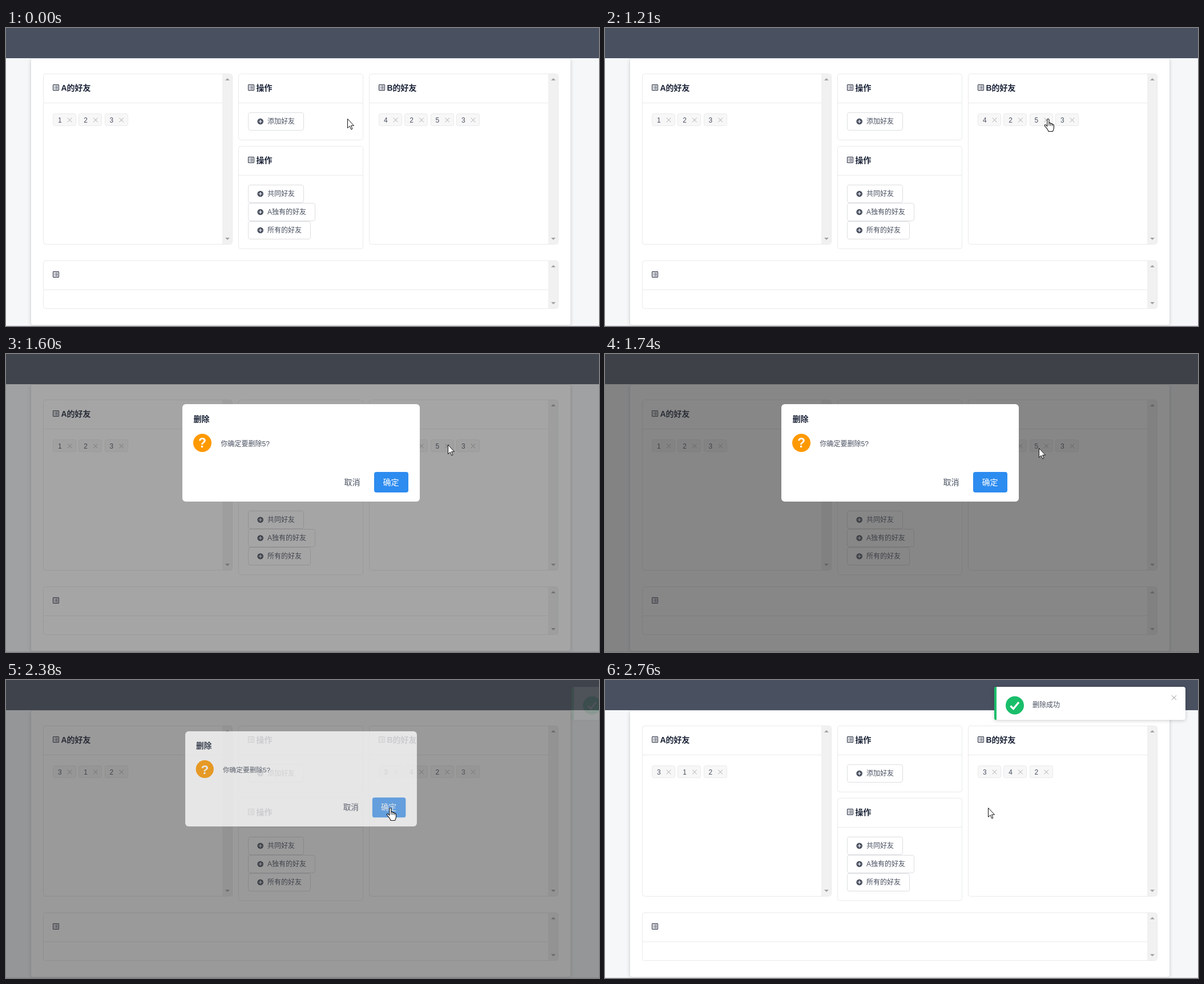
An HTML page for the animation above (3.71 s loop, 1039 by 523 pixels).

```html
<!DOCTYPE html>
<html lang="zh">
<head>
<meta charset="utf-8">
<title>好友</title>
<style>
  html, body { margin: 0; width: 100%; height: 100%; overflow: hidden; background: #f5f7f9; }
  svg { display: block; font-family: "Liberation Sans", "Noto Sans CJK SC", "Noto Sans CJK", sans-serif; }
  .shadow { filter: drop-shadow(0 1px 3px rgba(0, 0, 0, .2)); }
  #dialog { transform-origin: 517px 173.5px; }
</style>
</head>
<body>
<svg id="stage" width="1039" height="523" viewBox="0 0 1039 523"></svg>
<script>
const LOOP = 3710;
const INK = '#495060', TITLE = '#1c2438', LINE = '#e9eaec';

// Static drawing helpers, each returning SVG markup
const rect = (x, y, w, h, fill, extra = '') =>
  `<rect x="${x}" y="${y}" width="${w}" height="${h}" fill="${fill}" ${extra}/>`;
const outline = (x, y, w, h, fill, stroke, r) =>
  rect(x + .5, y + .5, w - 1, h - 1, fill, `stroke="${stroke}" rx="${r}"`);
const path = (d, stroke, width = 1, fill = 'none') =>
  `<path d="${d}" stroke="${stroke}" stroke-width="${width}" fill="${fill}"/>`;
const circle = (x, y, r, fill) => `<circle cx="${x}" cy="${y}" r="${r}" fill="${fill}"/>`;
const text = (x, middle, string, size = 12, fill = INK, extra = '') =>
  `<text x="${x}" y="${middle + size * .365}" font-size="${size}" fill="${fill}" ${extra}>${string}</text>`;
const cross = (x, y, r, stroke) =>
  path(`M${x - r} ${y - r}l${2 * r} ${2 * r}m0 ${-2 * r}l${-2 * r} ${2 * r}`, stroke);

function heading(x, y, string) {
  const icon = outline(x, y - 6, 11, 11, 'none', TITLE, .5) +
    [-3, -.5, 2].map(dy => path(`M${x + 2} ${y + dy}h1.2m1 0h4.8`, TITLE)).join('');
  return icon + text(x + 14.5, y, string, 14, TITLE, 'font-weight="bold"');
}

function scrollbar(right, top, bottom) {
  const x = right - 9;
  return path(`M${right - 18} ${top + 1}h14q3 0 3 3V${bottom - 4}q0 3-3 3h-14z`, 'none', 0, '#f1f1f1') +
    path(`M${x - 4} ${top + 12}l4-4 4 4z`, 'none', 0, '#a3a3a3') +
    path(`M${x - 4} ${bottom - 12}l4 4 4-4z`, 'none', 0, '#a3a3a3');
}

function panel(x, y, w, h, title, scrolls) {
  return outline(x, y, w, h, '#fff', LINE, 4) +
    rect(x + 1, y + 51, w - (scrolls ? 19 : 2), 1, LINE) +
    (scrolls ? scrollbar(x + w, y, y + h) : '') +
    heading(x + 17, y + 25, title);
}

function button(y, w, label) {
  return outline(424, y, w, 32, '#fff', '#dddee1', 3.5) +
    circle(445.7, y + 16, 5.3, INK) +
    path(`M442.7 ${y + 16}h6m-3-3v6`, '#fff', 1.2) +
    text(458, y + 15.5, label);
}

function tag(x, digit) {
  return outline(Math.round(x), 150, 41, 22, '#f7f7f7', LINE, 3) +
    text(x + 9, 161.5, digit) + cross(x + 29.6, 161.5, 3.8, '#aaa');
}
const tags = (x, digits) => [...digits].map((d, i) => tag(x + i * 45.3, d)).join('');

stage.innerHTML = `
  <g class="shadow">${rect(44, 54, 945, 467, '#fff', 'rx="4"')}</g>
  ${rect(0, 0, 1039, 53, INK)}
  ${rect(0, 522, 1039, 1, '#dadcdf')}
  ${panel(65, 80, 332, 300, 'A的好友', true)}
  ${panel(407, 80, 219, 117, '操作')}
  ${panel(407, 207, 219, 181, '操作')}
  ${panel(636, 80, 332, 300, 'B的好友', true)}
  ${panel(65, 408, 903, 85, '', true)}
  ${button(148, 98, '添加好友')}
  ${button(275, 98, '共同好友')}
  ${button(307, 118, 'A独有的好友')}
  ${button(339, 110, '所有的好友')}
  <g id="before">${tags(82, '123')}${tags(653, '4253')}</g>
  <g id="after">${tags(82, '312')}${tags(653, '342')}</g>
  <g id="leaving">${tag(653 + 3 * 45.3, '3')}</g>
  ${rect(0, 0, 1039, 523, 'rgb(55,55,55)', 'id="mask"')}
  <g id="dialog">
    ${rect(309, 88, 416, 171, '#fff', 'rx="6"')}
    ${text(328.5, 114, '删除', 14, TITLE, 'font-weight="bold"')}
    ${circle(344, 156, 16, '#f90')}
    ${text(344, 156, '?', 23, '#fff', 'font-weight="bold" text-anchor="middle"')}
    ${text(376.5, 157.5, '你确定要删除5?')}
    ${text(592.5, 224.5, '取消', 14)}
    ${rect(645, 207, 60, 36, '#2d8cf0', 'rx="4" id="confirm"')}
    ${text(660.5, 224.5, '确定', 14, '#fff')}
  </g>
  <g id="notice" class="shadow">
    ${rect(682, 12, 335, 58, '#fff', 'rx="4"')}
    ${path('M686 12h-1q-3 0-3 3v52q0 3 3 3h1z', 'none', 0, '#19be6b')}
    ${circle(718, 44.5, 16, '#19be6b')}
    ${path('M710.5 45.5l5 5 9.5-11.5', '#fff', 3.4)}
    ${text(749, 44, '删除成功')}
    ${cross(997, 31, 4, '#999')}
  </g>
  <g id="cursor">
    <g id="arrow">${path('M.5.5V16.5L4.2 13.2 6.8 19 9 18 6.5 12.3H11.5Z', '#111', 1, '#fff')}</g>
    <g id="hand">
      ${path('M.8 1.8Q2.4-.8 4 1.8V7.5Q6.4 6.8 7 8.8 9.4 8 10 10.2 12.5 9.6 12.5 12V16Q12.4 19 10.5 22.5H3Q2 19-3.4 13.2-4.4 11-2.5 10.8-.6 11.2.8 13.8Z', '#111', 1.1, '#fff')}
      ${path('M4 7.5v5m3-3.7v4m3-2.6v3', '#111')}
    </g>
  </g>`;

const part = Object.fromEntries([...stage.querySelectorAll('[id]')].map(node => [node.id, node]));

// Pointer positions: [time, x, y]
const pointer = [
  [0, 598, 159], [430, 606, 164], [510, 640, 176], [580, 690, 182], [660, 735, 180],
  [740, 762, 173], [810, 773, 167], [890, 775, 167], [980, 777, 165], [1060, 775, 162],
  [1130, 773, 160], [1210, 774, 159], [1680, 760, 165], [1750, 735, 178], [1830, 700, 190],
  [1910, 680, 198], [2000, 673, 212], [2070, 671, 220], [2150, 671, 224]
];
// The screen refreshes only at these moments
const refreshes = [...pointer.map(p => p[0]), 1440, 1510, 1600, 2380, 2460, 2530, 2620, 2690, 2760];

const OPEN = 1376, CLOSE = 2331;
const ramp = (t, start, duration) => Math.min(1, Math.max(0, (t - start) / duration));
const easeInOut = p => .5 - .5 * Math.cos(Math.PI * p);
const mix = (a, b, p) => a + (b - a) * p;
const show = (node, visible) => { node.style.display = visible ? '' : 'none'; };

function render(time) {
  const t = Math.max(...refreshes.filter(r => r <= time));

  const [, x, y] = pointer.findLast(p => p[0] <= t);
  const isHand = (t >= 810 && t < 1440) || (t >= 2000 && t < 2760);
  part.cursor.setAttribute('transform', `translate(${x} ${y})`);
  show(part.hand, isHand);
  show(part.arrow, !isHand);

  const deleted = t >= CLOSE;
  show(part.before, !deleted);
  show(part.after, deleted);
  show(part.leaving, deleted);
  part.leaving.style.opacity = 1 - ramp(t, CLOSE, 300);

  part.mask.style.opacity = .6 * (ramp(t, OPEN, 300) - ramp(t, CLOSE, 300));
  const opened = ramp(t, OPEN, 200) - ramp(t, CLOSE, 200);
  part.dialog.style.opacity = opened;
  part.dialog.style.transform = `scale(${mix(.9, 1, opened)})`;
  const hover = ramp(t, 1950, 200);
  part.confirm.setAttribute('fill',
    `rgb(${mix(45, 83, hover)},${mix(140, 160, hover)},${mix(240, 243, hover)})`);

  const arrived = easeInOut(ramp(t, 2326, 300));
  part.notice.style.opacity = arrived;
  part.notice.style.transform = `translateX(${335 * (1 - arrived)}px)`;
}

function tick() {
  render(performance.now() % LOOP);
  requestAnimationFrame(tick);
}
tick();
</script>
</body>
</html>
```
